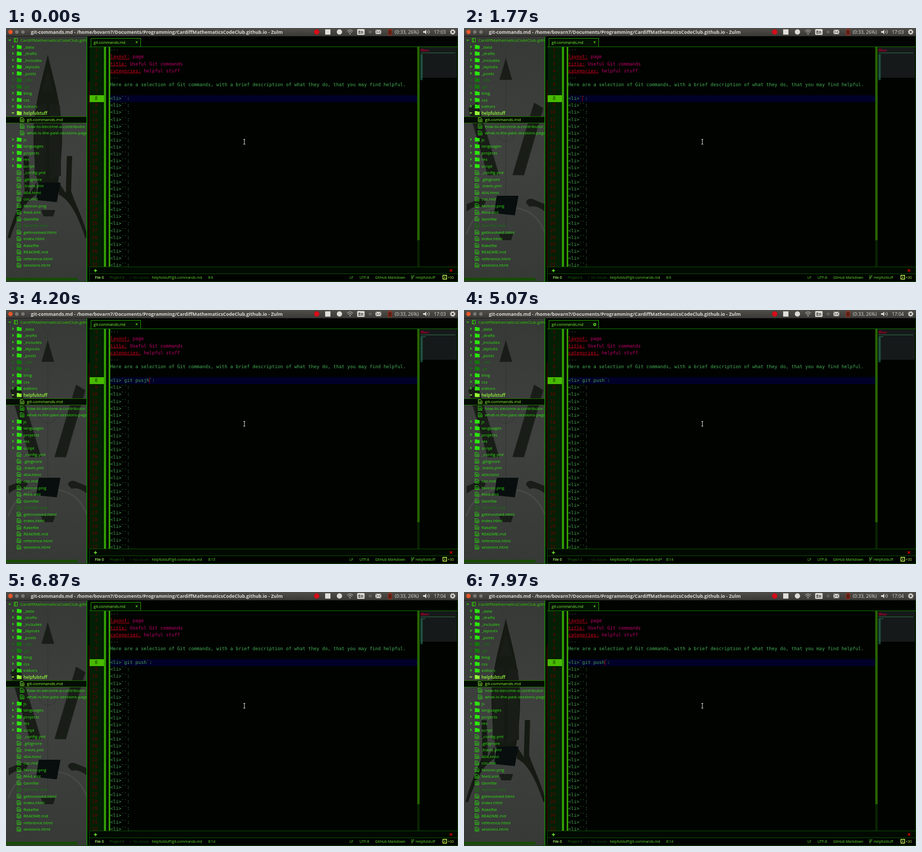
An HTML page for the animation above (8 s loop, 854x480 px).

```html
<!DOCTYPE html>
<html lang="en">
<head>
<meta charset="utf-8">
<title>Editor session</title>
<style>
html, body { margin: 0; width: 100%; height: 100%; overflow: hidden; background: #000; }
svg { display: block; width: 854px; height: 480px; }
text { font-family: "Open Sans", "Noto Sans", sans-serif; white-space: pre; }
.code text { font: 8.75px "DejaVu Sans Mono", monospace; }
.tree text { font-size: 8px; }
.status text { font-size: 6.7px; }
.part { transform-box: fill-box; transform-origin: center; animation: 8s linear infinite; }
.whole { animation: whole 8s linear infinite; }
.apart { animation: apart 8s linear infinite; }
.nose { animation-name: nose; }
.panel { animation-name: panel; }
.block { animation-name: block; }
.nozzle { animation-name: nozzle; }
@keyframes whole { 0% { opacity: 1 } 8%, 90% { opacity: 0 } 97%, 100% { opacity: 1 } }
@keyframes apart { 0% { opacity: 0 } 8%, 90% { opacity: 1 } 97%, 100% { opacity: 0 } }
@keyframes nose { 0%, 98%, 100% { transform: translateY(23px) } 21%, 87% { transform: none } }
@keyframes panel { 0%, 98%, 100% { transform: none } 21%, 87% { transform: translate(29px, -1px) rotate(17deg) } }
@keyframes block { 0%, 98%, 100% { transform: translateY(-25px) } 21%, 87% { transform: none } }
@keyframes nozzle { 0%, 98%, 100% { transform: translateY(-45px) } 21%, 87% { transform: none } }
</style>
</head>
<body>
<svg viewBox="0 0 854 480">
  <defs>
    <linearGradient id="barFill" x2="0" y2="1"><stop stop-color="#4f4e4a"/><stop offset="1" stop-color="#3a3936"/></linearGradient>
    <linearGradient id="sideFill" x2="0" y2="1"><stop stop-color="#363936"/><stop offset=".5" stop-color="#3f413f"/><stop offset="1" stop-color="#363936"/></linearGradient>
    <clipPath id="sideClip"><rect y="16" width="152" height="464"/></clipPath>
    <clipPath id="codeClip"><rect x="157" y="36" width="697" height="415"/></clipPath>
  </defs>

  <g clip-path="url(#sideClip)">
    <rect y="16" width="153" height="464" fill="url(#sideFill)"/>
    <g class="apart" fill="none" stroke="#303430">
      <path d="M79 40V390"/>
      <path d="M4 390Q20 345 60 340H98Q138 345 154 390" stroke="#474947" stroke-width="3"/>
      <circle cx="79" cy="197" r="17"/>
    </g>
    <g class="whole" fill="#151a13">
      <path d="M79 50C85 80 106 145 106 200C106 240 102 270 98 294H60C56 270 52 240 52 200C52 145 73 80 79 50Z"/>
      <path d="M33 242H43L45 312L58 292V315C36 325 20 360 8 397H3C10 365 28 330 35 308Z"/>
      <path d="M125 242H115L113 312L100 292V315C122 325 138 360 150 397H155C148 365 130 330 123 308Z"/>
    </g>
    <g fill="#191d17">
      <path class="part nose" d="M79 57L91 98H67Z"/>
      <path class="part panel" d="M82 142L102 147L104 279L83 285Z"/>
      <g transform="translate(158) scale(-1 1)"><path class="part panel" d="M82 142L102 147L104 279L83 285Z"/></g>
      <path class="part block" d="M62 317H103L96 354L57 350Z" fill="#080e0e"/>
      <path class="part nozzle" d="M66 389H93L89 401H71Z"/>
      <g class="apart">
        <path d="M117 330Q119 321 129 323L153 333V347Q137 334 124 338Z"/>
        <path d="M41 330Q39 321 29 323L5 333V347Q21 334 34 338Z"/>
      </g>
    </g>
    <g class="tree" id="tree"></g>
    <rect y="472" width="135" height="5" fill="#174b00"/>
  </g>

  <rect x="152" y="16" width="702" height="464" fill="#000300"/>
  <rect x="152" y="16" width="1.5" height="464" fill="#159000"/>
  <rect x="156.5" y="100" width="1" height="351" fill="#650000"/>
  <path d="M157 35.5H854" stroke="#147500"/>
  <path d="M160.500 35V19.500H254.500V35" fill="#031103" stroke="#259b00"/>
  <text x="165.500" y="29.500" font-size="7.100" fill="#83f23b">git-commands.md</text>
  <text id="tabClose" x="244.500" y="30" font-size="8" font-weight="700" fill="#65e020">×</text>
  <circle id="tabDirty" cx="247" cy="27.500" r="2" fill="none" stroke="#75f030" stroke-width="1.300"/>

  <g clip-path="url(#codeClip)" class="code">
    <rect x="158" y="36" width="27" height="415" fill="#031f05"/>
    <rect x="197" y="127" width="580" height="13" fill="#000028"/>
    <rect x="158" y="127" width="27" height="13" fill="#48bb00"/>
    <rect x="185" y="36" width="4" height="415" fill="#329c00"/>
    <rect x="189" y="36" width="5" height="415" fill="#021002"/>
    <rect x="194" y="36" width="3" height="415" fill="#329c00"/>
    <g id="code"></g>
    <rect id="caret" y="128" width="1" height="11" fill="#a00000"/>
    <rect x="777" y="36" width="4.500" height="415" fill="#082300"/>
    <rect x="777" y="36" width="4.500" height="365" fill="#266400"/>
    <rect x="783" y="36" width="69" height="58" fill="#15191a"/>
    <g id="minimap"></g>
  </g>
  <path d="M448.500 210.500H452M450.300 210.500V219.500M448.500 219.500H452" stroke="#deded0" fill="none"/>

  <rect x="157" y="451" width="697" height="13" fill="#010a01"/>
  <path d="M157 451.500H854M157 464.500H854M157.500 451V480M0 479.500H854M853.500 16V480" stroke="#0a4b00"/>
  <path d="M166 458.500H172M169 455.500V461.500" stroke="#70f030" stroke-width="1.400"/>
  <path d="M838.500 456L843 460.500M843 456L838.500 460.500" stroke="#d00000" stroke-width="1.500"/>
  <g class="status" id="status"></g>

  <rect width="854" height="15.500" fill="url(#barFill)"/>
  <circle cx="8.500" cy="7.500" r="4.200" fill="#e4552b"/>
  <g fill="#787772" stroke="#30302c" stroke-width=".7"><circle cx="20.500" cy="7.500" r="4"/><circle cx="32" cy="7.500" r="4"/></g>
  <g id="titleBar"></g>
  <circle cx="587" cy="7.500" r="5" fill="#d80d1a" stroke="#8b2020"/>
  <rect x="603" y="2.500" width="10" height="10" fill="#e0dfda"/>
  <circle cx="630" cy="7.500" r="5" fill="#dbdad4"/>
  <g stroke="#a5a49e" fill="none" stroke-width="1.300">
    <path d="M644.500 6Q650 1 655.500 6M646.500 8.500Q650 5 653.500 8.500"/><circle cx="650" cy="11" r=".7"/>
  </g>
  <rect x="663.500" y="2" width="14" height="11" rx="1.500" fill="#dbdad4"/>
  <text x="665.500" y="10.700" font-size="8" font-weight="700" fill="#373632">En</text>
  <circle cx="688" cy="7.500" r="3" fill="#605f5a"/>
  <rect x="698" y="3.500" width="11" height="8" fill="#dbdad4"/><path d="M698 4L703.500 8.500L709 4M698 11L702 7.500M709 11L705 7.500" fill="none" stroke="#3d3c38"/>
  <path d="M722 3.500H729V13H722ZM724 2H727V3.500" fill="#562018" stroke="#a62f16"/>
  <path d="M788 6H791L794 3V12L791 9H788Z" fill="#dbdad4"/>
  <path d="M796 5.500Q798 7.500 796 9.500M798 3.500Q802 7.500 798 11.500" fill="none" stroke="#dbdad4"/>
  <circle cx="844" cy="7.500" r="3" fill="none" stroke="#dbdad4" stroke-width="2"/>
  <circle cx="844" cy="7.500" r="4.500" fill="none" stroke="#dbdad4" stroke-width="1.500" stroke-dasharray="1.770"/>
</svg>

<script>
const DURATION = 8000, CHAR = 5.268, ROW = 13.125, PREFIX = '<li>`';
const $ = id => document.getElementById(id);

function add(parent, tag, attrs, content = '') {
  const node = document.createElementNS('http://www.w3.org/2000/svg', tag);
  for (const key in attrs) node.setAttribute(key, attrs[key]);
  node.textContent = content;
  parent.append(node);
  return node;
}
const label = (parent, x, y, content, fill, extra = {}) => add(parent, 'text', { x, y, fill, ...extra }, content);

// Project tree: ">" closed folder, "v" open folder, "+" nested file, "~" ignored.
const entries = `>_data >_drafts >_includes >_layouts >_posts ~>_site ~>.git >blog >css >editors
  vhelpfulstuff +git-commands.md +how-to-become-a-contributor.md +what-is-the-past-sessions-page.md
  >js >languages >projects >res >script _config.yml .gitignore .travis.yml 404.html coc.md
  favicon.png feed.xml Gemfile ~Gemfile.lock getinvolved.html index.html Rakefile README.md
  reference.html sessions.html`.split(/\s+/);

function chevron(x, y, open, stroke) {
  const d = open ? `M${x - 2} ${y - 1}l2 2l2 -2` : `M${x - 1} ${y - 2}l2 2l-2 2`;
  add($('tree'), 'path', { d, fill: 'none', stroke, 'stroke-width': 1.2 });
}

function drawTree() {
  const tree = $('tree');
  add(tree, 'rect', { y: 167, width: 152, height: 12.5, fill: '#040d04' });
  add(tree, 'path', { d: 'M0 167.500H152M0 179.500H152', stroke: '#1d6c00' });
  chevron(7, 23, true, '#2fd000');
  add(tree, 'path', { d: 'M15.500 19.500H21.500V26.500H15.500ZM17.500 19.500V26.500', fill: 'none', stroke: '#2fd000' });
  label(tree, 27, 26, 'CardiffMathematicsCodeClub.github.io', '#2fd000');
  entries.forEach((entry, i) => {
    const y = 35.5 + i * 12.5, dim = entry[0] === '~';
    const [, kind, name] = entry.replace('~', '').match(/^([>v+]?)(.*)$/);
    const nested = kind === '+', open = kind === 'v', active = name === 'git-commands.md';
    const fill = dim ? '#127a0a' : open || active ? '#94ff38' : '#2be60d';
    const left = nested ? 27 : 21;
    if (kind && !nested) {
      chevron(13, y, open, fill);
      add(tree, 'path', { d: `M20.500 ${y - 3.5}h4l1 1h4v6.500h-9z`, fill });
    } else {
      add(tree, 'path', {
        d: `M${left} ${y - 3.5}h4.500l2.500 2.500v5h-7zM${left + 1.5} ${y}h4M${left + 1.5} ${y + 2}h4`,
        fill: 'none', stroke: fill, 'stroke-width': .9
      });
    }
    label(tree, nested ? 39.5 : 33, y + 3, name, fill, open ? { 'font-weight': 600 } : {});
  });
}

const prose = 'Here are a selection of Git commands, with a brief description of what they do, that you may find helpful.';
const front = [['layout:', 'page'], ['title:', 'Useful Git commands'], ['categories:', 'helpful stuff']];
const baseline = line => 44.3 + (line - 1) * ROW;
let command, miniLine;

function drawCode() {
  const code = $('code'), mini = $('minimap');
  const strip = (line, chars, fill) =>
    add(mini, 'rect', { x: 783, y: 36 + line * 1.75, width: chars * .62, height: 1, fill });
  for (let line = 1; line <= 32; line++) {
    label(code, 173, baseline(line), line, line === 8 ? '#123a00' : '#700000', { 'text-anchor': 'end' });
  }
  for (const line of [1, 5]) label(code, 197, baseline(line), '---', '#53634b');
  front.forEach(([key, value], i) => {
    label(code, 197, baseline(i + 2), key, '#d0001c', { 'text-decoration': 'underline' });
    label(code, 197 + (key.length + 1) * CHAR, baseline(i + 2), value, '#c00068');
    strip(i + 2, key.length + value.length + 1, '#a00028');
  });
  label(code, 197, baseline(6), prose, '#45ad55');
  strip(6, 106, '#397050');
  for (let line = 8; line <= 35; line++) {
    const row = label(code, 197, baseline(line), PREFIX + '`:', '#4aa455');
    const mark = strip(line, 7, '#287858');
    if (line === 8) { command = row; miniLine = mark; }
  }
}

let fileLabel, position, clock;
function drawBars() {
  const status = $('status'), bar = $('titleBar'), y = 473.5, green = '#65dc32', pale = '#dbdad4';
  label(status, 168, y, 'File 0', '#b3ff75', { 'font-weight': 600 });
  label(status, 196, y, 'Project 0', '#236c12');
  label(status, 233, y, '✓ No Issues', '#174b0b');
  fileLabel = label(status, 275.5, y, '', green);
  position = label(status, 382, y, '', green);
  label(status, 649, y, 'LF', green);
  label(status, 668, y, 'UTF-8', green);
  label(status, 697.5, y, 'GitHub Markdown', green);
  add(status, 'path', { d: 'M767 467V475M770.500 467V469Q770.500 471 767 472', fill: 'none', stroke: green });
  label(status, 774, y, 'Helpfulstuff', green);
  add(status, 'path', { d: 'M825.500 467.500h7v7h-7zM828 471h2', fill: 'none', stroke: '#c9ff55', 'stroke-width': 1.3 });
  label(status, 834.5, y, '+30', '#b6f548');
  label(bar, 47, 10.7, 'git-commands.md - /home/bovarn7/Documents/Programming/CardiffMathematicsCodeClub.github.io - Zulm',
    pale, { 'font-size': 8.8, 'font-weight': 700 });
  label(bar, 734.5, 10.8, '(0:33, 26%)', pale, { 'font-size': 9 });
  clock = label(bar, 808.5, 10.8, '', pale, { 'font-size': 8.8 });
}

// "<" is a backspace.
const keys = 'git pu<<< pusjh<<h';
const keyTimes = [1800, 1920, 2040, 2160, 2290, 2420, 2580, 2700, 2820,
  3110, 3290, 3560, 3760, 3940, 4130, 4360, 4490, 4620];

function render(t) {
  let typed = '', lastKey = -700;
  keyTimes.forEach((time, i) => {
    if (time > t) return;
    typed = keys[i] === '<' ? typed.slice(0, -1) : typed + keys[i];
    lastKey = time;
  });
  const dirty = t >= 4930 && t < 6300, column = PREFIX.length + typed.length;
  command.textContent = PREFIX + typed + '`:';
  miniLine.setAttribute('width', (column + 2) * .62);
  $('caret').setAttribute('x', 197 + column * CHAR);
  $('caret').style.opacity = (t - lastKey) % 800 < 400 ? 1 : 0;
  $('tabDirty').style.opacity = dirty ? 1 : 0;
  $('tabClose').style.opacity = dirty ? 0 : 1;
  fileLabel.textContent = 'helpfulstuff/git-commands.md' + (dirty ? '*' : '');
  position.textContent = '8:' + (column + 1);
  clock.textContent = t < 4700 ? '17:03' : '17:04';
}

drawTree();
drawCode();
drawBars();
render(0);

let start;
function tick(now) {
  start ??= now;
  render((now - start) % DURATION);
  requestAnimationFrame(tick);
}
requestAnimationFrame(tick);
</script>
</body>
</html>
```
